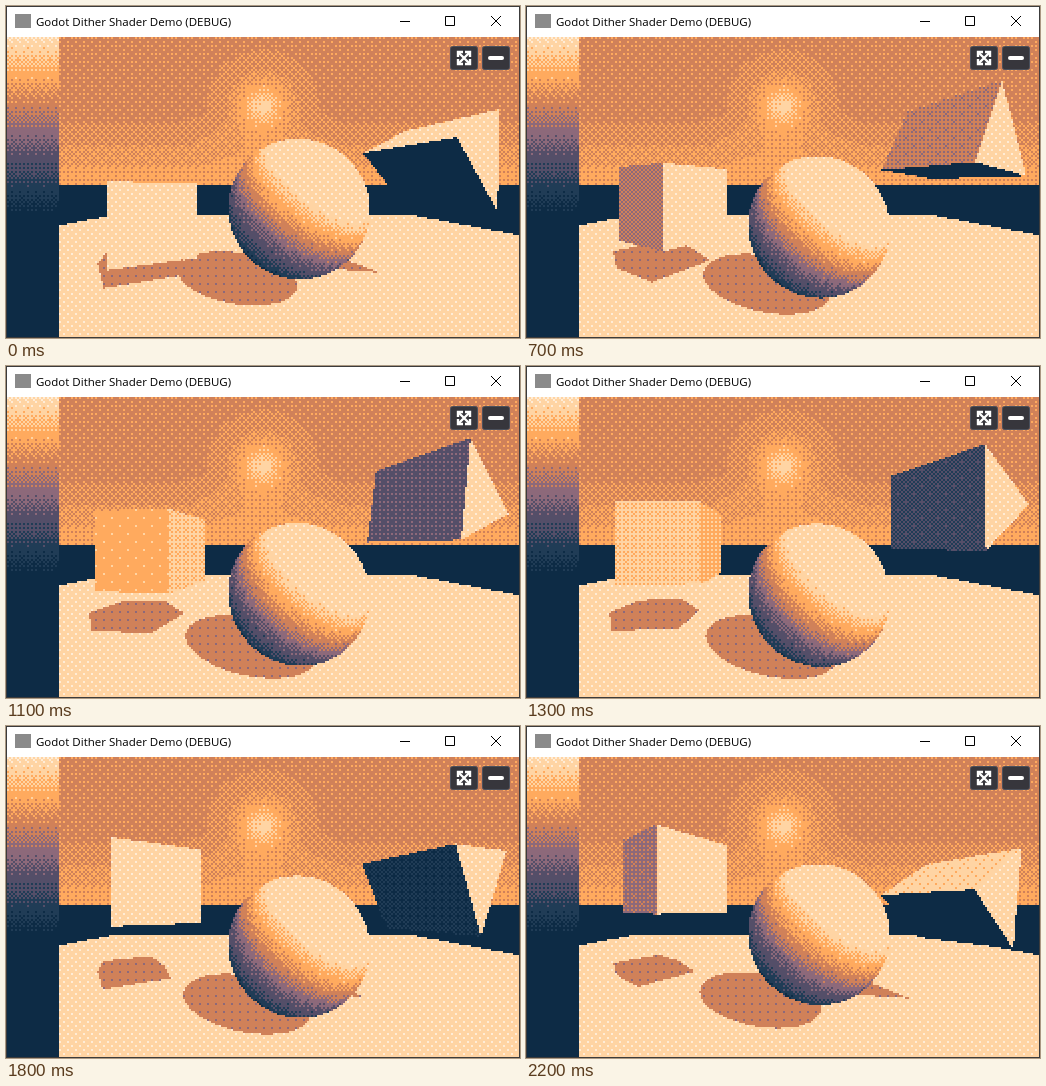
Recreate the animation shown at these times as an HTML page with a canvas. Size 514 by 332 pixels, loop 2300 ms.

```html
<!DOCTYPE html>
<html lang="en">
<head>
<meta charset="utf-8">
<title>Godot Dither Shader Demo (DEBUG)</title>
<style>
html, body { margin: 0; width: 100%; height: 100%; overflow: hidden; background: #fff; }
canvas { position: absolute; left: 1px; top: 31px; width: 512px; height: 300px; image-rendering: pixelated; }
svg { position: absolute; left: 0; top: 0; }
text { font: 11.5px "Open Sans", "Noto Sans", sans-serif; }
</style>
</head>
<body>
<canvas id="view" width="256" height="150"></canvas>
<svg width="514" height="332" viewBox="0 0 514 332">
  <rect x=".5" y=".5" width="513" height="331" fill="none" stroke="#3c3c3c"/>
  <rect x="9" y="8" width="16" height="14" fill="#8a8a8a"/>
  <text x="30" y="20">Godot Dither Shader Demo (DEBUG)</text>
  <path d="M394 15.5h10M439.5 10.5h9v9h-9zM485 10l10 10M495 10l-10 10" fill="none" stroke="#000"/>
  <g fill="#37363c" stroke="#4b505c">
    <rect x="444.5" y="40.5" width="27" height="23" rx="2"/>
    <rect x="476.5" y="40.5" width="27" height="23" rx="2"/>
  </g>
  <g fill="none" stroke="#fff">
    <path d="M453 47l10 10M463 47l-10 10" stroke-width="2.4"/>
    <path d="M452 51v-5h5M459 46h5v5M464 53v5h-5M457 58h-5v-5" stroke-width="2.4"/>
    <path d="M484 52h12" stroke-width="4" stroke-linecap="round"/>
  </g>
</svg>
<script>
const W = 256, H = 150, FOCAL = 107, CX = 127.5, CY = 74.5;
const FLOOR = 0.94;                    // ground plane below the eye, y points down
const SUN = [0.47, -0.735, -0.49];     // towards the light
const CAST = [-0.77, 1, 0.9];          // shadow shift per unit of height
const SHADOW = 3.94, LIT = 6.13;
const DEPTH = 32 / 7;                  // brightness steps per palette colour
const RADIUS = 0.53;
const palette = ["0d2b45", "203c56", "544e68", "8d697a", "d08159", "ffaa5e", "ffd4a3", "ffecd6"]
  .map(hex => parseInt(hex, 16)).map(c => [c >> 16, c >> 8 & 255, c & 255]);

const ctx = document.getElementById("view").getContext("2d");
const image = ctx.createImageData(W, H);
const backdrop = new Float32Array(W * H), level = new Float32Array(W * H);

const dot = (a, b) => a[0] * b[0] + a[1] * b[1] + a[2] * b[2];
const add = (a, b) => a.map((v, k) => v + b[k]);
const sub = (a, b) => a.map((v, k) => v - b[k]);
const scale = (a, s) => a.map(v => v * s);
const cross = (a, b) => [a[1] * b[2] - a[2] * b[1], a[2] * b[0] - a[0] * b[2], a[0] * b[1] - a[1] * b[0]];
const mean = pts => scale(pts.reduce(add), 1 / pts.length);
const project = ([x, y, z]) => [CX + FOCAL * x / z, CY + FOCAL * y / z];
const ray = (i, j) => [(i - CX) / FOCAL, (j - CY) / FOCAL, 1];
const toFloor = p => add(p, scale(CAST, FLOOR - p[1]));
const shade = d => Math.max(0, Math.min(LIT, 2.4 + d * (d > 0 ? 6.3 : 3.4)));
const onFloor = (i, j) => j > 88 && Math.abs(i - CX) <= 5.32 * (j - CY);

function bayer(x, y) {
  let v = 0;
  for (let b = 0; b < 3; b++) v = v << 2 | ((x ^ y) >> b & 1) << 1 | (y >> b & 1);
  return (v + 0.5) / 64;
}

function sky(i, j) {
  const r = 2 * Math.hypot(i - CX, j - 34);
  const haze = 0.75 * Math.max(0, (j - 37) / 37);
  return 4.15 + haze + 0.3 * Math.max(0, 1 - r / 85) + 1.65 * Math.exp(-((r / 20) ** 1.5));
}

function eachCell(fn) {
  for (let j = 0; j < H; j++) for (let i = 0; i < W; i++) fn(i, j, j * W + i);
}

eachCell((i, j, n) => {
  backdrop[n] = j < 74 ? sky(i, j) : onFloor(i, j) ? LIT : 0;
});

function fill(pts, value, floorOnly) {
  const xs = pts.map(p => p[0]), ys = pts.map(p => p[1]);
  const x0 = Math.max(0, Math.ceil(Math.min(...xs))), x1 = Math.min(W - 1, Math.max(...xs));
  const y0 = Math.max(0, Math.ceil(Math.min(...ys))), y1 = Math.min(H - 1, Math.max(...ys));
  for (let j = y0; j <= y1; j++) for (let i = x0; i <= x1; i++) {
    let left = false, right = false;
    pts.forEach(([ax, ay], k) => {
      const [bx, by] = pts[(k + 1) % pts.length];
      const side = (bx - ax) * (j - ay) - (by - ay) * (i - ax);
      if (side > 0) left = true;
      if (side < 0) right = true;
    });
    if (!(left && right) && (!floorOnly || onFloor(i, j))) level[j * W + i] = value;
  }
}

// Faces of a ring of points swept along an axis
function extrude(ring, axis) {
  const end = ring.map(p => add(p, axis));
  const sides = ring.map((p, k) => {
    const m = (k + 1) % ring.length;
    return [p, ring[m], end[m], end[k]];
  });
  return [ring, end, ...sides];
}

function box(t) {
  const y = -0.363 * Math.sin(t - 1.2) - 0.363;
  const ring = [0, 1, 2, 3].map(k => {
    const a = t - 0.465 + k * Math.PI / 2;
    return [-1.111 + 0.513 * Math.sin(a), y, 2.24 - 0.513 * Math.cos(a)];
  });
  return extrude(ring, [0, 0.726, 0]);
}

function prism(t) {
  const s = 0.363, c = Math.cos(t - 1.28), n = Math.sin(t - 1.28);
  const y = -0.222 - 0.125 * Math.cos(2 * (t - 1.26));
  const ring = [[s, 0], [-s, s], [-s, -s]].map(([u, v]) => {
    const across = u * c - v * n, up = u * n + v * c;
    return [1.714 + 0.903 * across, y - up, 1.621 + 0.43 * across];
  });
  return extrude(ring, [-0.312, 0, 0.656]);
}

const ball = t => [0.26, 0.233 + 0.115 * Math.cos(2 * (t - 1.26)), 1.707];

function drawSolid(faces) {
  const core = mean(faces[0].concat(faces[1]));
  for (const face of faces) {
    const mid = mean(face);
    let normal = cross(sub(face[1], face[0]), sub(face[2], face[0]));
    normal = scale(normal, 1 / Math.hypot(...normal));
    if (dot(normal, sub(mid, core)) < 0) normal = scale(normal, -1);
    if (dot(normal, mid) < 0) fill(face.map(project), shade(dot(normal, SUN)));
  }
}

function drawBallShadow(center) {
  for (let j = 89; j < H; j++) for (let i = 26; i < W; i++) {
    const spot = scale(ray(i, j), FLOOR * FOCAL / (j - CY));
    const d = sub(spot, center);
    const away = dot(d, d) - dot(d, CAST) ** 2 / dot(CAST, CAST);
    if (away < RADIUS ** 2 && onFloor(i, j)) level[j * W + i] = SHADOW;
  }
}

function drawBall(center) {
  const c = dot(center, center) - RADIUS ** 2;
  eachCell((i, j, n) => {
    const d = ray(i, j), a = dot(d, d), b = dot(d, center), root = b * b - a * c;
    if (root < 0) return;
    const hit = scale(d, (b - Math.sqrt(root)) / a);
    level[n] = shade(dot(sub(hit, center), SUN) / RADIUS);
  });
}

function dither() {
  eachCell((i, j, n) => {
    const raw = i < 26 ? Math.max(0, (178 - 2 * j) / 28) : level[n];
    const v = Math.round(raw * DEPTH) / DEPTH, base = Math.floor(v);
    const color = palette[Math.min(7, base + (v - base > bayer(i, j) ? 1 : 0))];
    image.data.set(color, n * 4);
    image.data[n * 4 + 3] = 255;
  });
  ctx.putImageData(image, 0, 0);
}

function render(t) {
  level.set(backdrop);
  const solids = [prism(t), box(t)], center = ball(t);
  for (const faces of solids)
    for (const face of faces) fill(face.map(p => project(toFloor(p))), SHADOW, true);
  drawBallShadow(center);
  solids.forEach(drawSolid);
  drawBall(center);
  dither();
}

let shown = -1;
function tick() {
  let step = Math.floor(performance.now() % 2300 / 100);
  if (step < 2) step = 0;
  if (step !== shown) {
    const t = step / 10;
    render(t + 0.12 * Math.max(0, 1 - t / 0.9));   // the scene starts slightly late
    shown = step;
  }
  requestAnimationFrame(tick);
}
tick();
</script>
</body>
</html>
```
